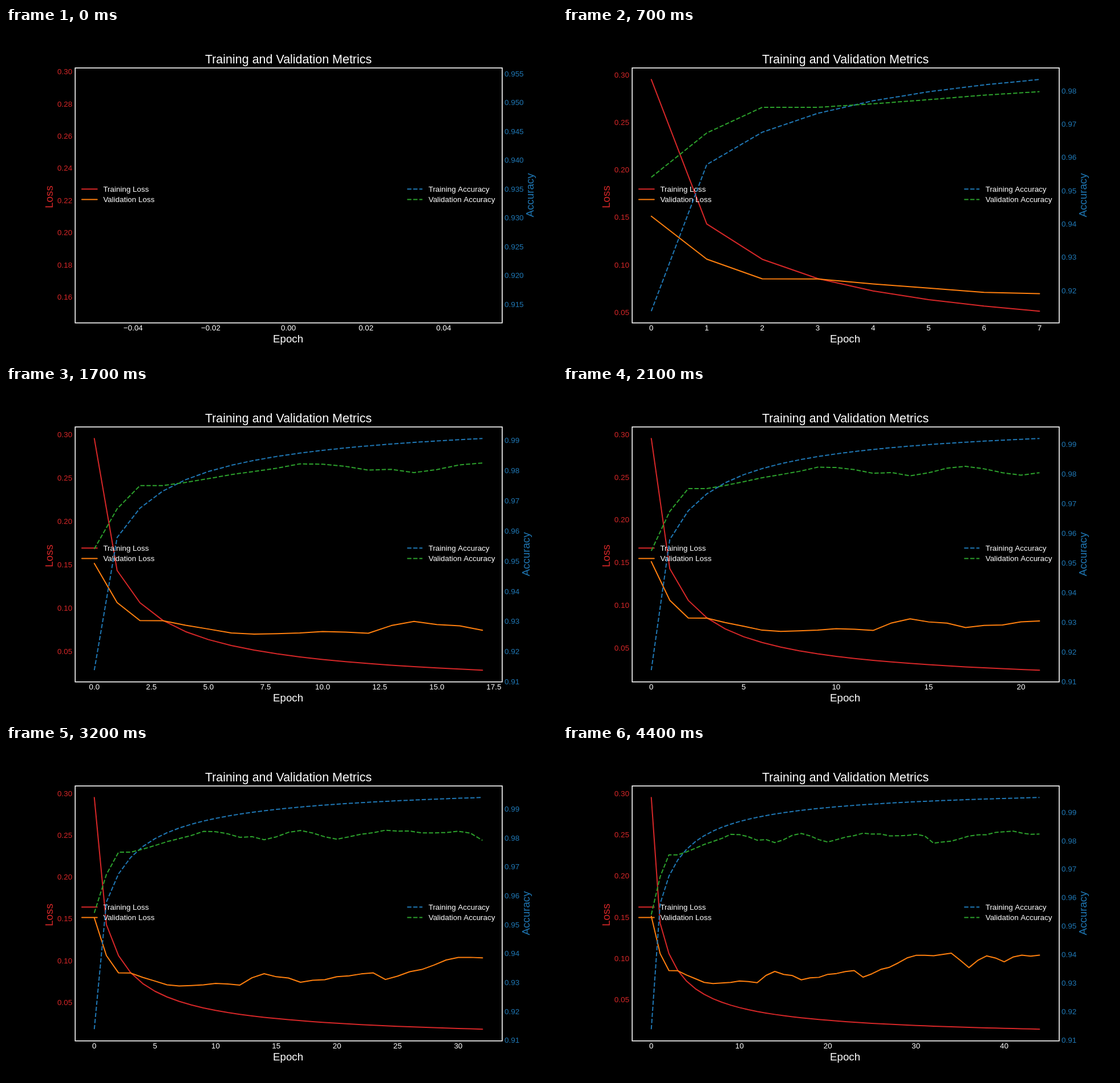
These frames come from a looping animation (966 by 580 pixels, 4500 ms). An HTML page with a canvas:

```html
<!DOCTYPE html>
<html lang="en">
<head>
<meta charset="utf-8">
<title>Training and Validation Metrics</title>
<style>
html, body { margin: 0; width: 100%; height: 100%; overflow: hidden; background: #000; }
canvas { display: block; }
</style>
</head>
<body>
<canvas id="stage" width="966" height="580"></canvas>
<script>
const g = document.getElementById('stage').getContext('2d');
const RED = '#d62728', ORANGE = '#ff7f0e', BLUE = '#1f77b4', GREEN = '#2ca02c', WHITE = '#fff';
const LEFT = 120.75, RIGHT = 869.4, TOP = 69.9, BOTTOM = 516.5;
const MID_X = (LEFT + RIGHT) / 2, MID_Y = (TOP + BOTTOM) / 2;
const SMALL = 13.42, LABEL = 18.78, TITLE = 21.47;
const EPOCHS = 45, STEP_MS = 100;

const series = rule => Array.from({ length: EPOCHS }, (_, i) => rule(i));

// Repeatable noise from -1 to 1
function noise(i) {
  const s = Math.sin(i * 12.9898) * 43758.5453;
  return (s - Math.floor(s)) * 2 - 1;
}

// Straight lines between [epoch, value] keys, with a little noise off the keys
function keyed(keys, jitter) {
  return series(i => {
    const k = keys.findIndex(([epoch]) => epoch >= i);
    const [e1, v1] = keys[k];
    if (e1 === i) return v1;
    const [e0, v0] = keys[k - 1];
    return v0 + (v1 - v0) * (i - e0) / (e1 - e0) + jitter * noise(i);
  });
}

// Training follows a power law after a steep first epoch
const trainLoss = series(i => i ? 0.1429 * (2 / (i + 1)) ** 0.742 : 0.2951);
const trainAcc = series(i => 1 - (i ? 0.0422 * (2.3 / (i + 1.3)) ** 0.725 : 0.0862));
const valLoss = keyed([
  [0, 0.1511], [1, 0.1059], [2, 0.0852], [3, 0.085], [6, 0.0709], [12, 0.0706],
  [14, 0.0842], [17, 0.074], [23, 0.0852], [24, 0.0773], [29, 0.1006], [34, 0.1063],
  [36, 0.0888], [38, 0.103], [40, 0.0959], [42, 0.1039], [44, 0.1039]
], 0.002);
const valAcc = keyed([
  [0, 0.954], [1, 0.9673], [2, 0.975], [3, 0.975], [7, 0.9797], [9, 0.9822], [14, 0.9793],
  [17, 0.9825], [20, 0.9795], [24, 0.9826], [31, 0.9816], [32, 0.9791], [40, 0.9831], [44, 0.9823]
], 0.0005);

function text(str, x, y, size, color, align = 'center', turn = 0) {
  g.save();
  g.translate(x, Math.round(y));
  g.rotate(turn);
  g.font = `${size}px "Liberation Sans", Arial, sans-serif`;
  g.textAlign = align;
  g.fillStyle = color;
  g.fillText(str, 0, 0);
  g.restore();
}

function line(points, color, dashed) {
  if (points.length < 2) return;
  g.strokeStyle = color;
  g.lineWidth = 2;
  g.lineJoin = 'round';
  g.lineCap = dashed ? 'butt' : 'round';
  g.setLineDash(dashed ? [7.45, 3.22] : []);
  g.beginPath();
  for (const [x, y] of points) g.lineTo(x, y);
  g.stroke();
}

// Axis fitted to the values with a 5% margin, at most nine tick intervals
function makeAxis(values, from, to) {
  let lo = Math.min(...values), hi = Math.max(...values);
  if (lo === hi) { lo -= 0.05; hi += 0.05; }
  const pad = (hi - lo) * 0.05;
  lo -= pad;
  hi += pad;
  const raw = (hi - lo) / 9, power = 10 ** Math.floor(Math.log10(raw));
  const step = [1, 2, 2.5, 5, 10].find(s => s * power >= raw) * power;
  let digits = 0;
  while (Math.abs(step * 10 ** digits - Math.round(step * 10 ** digits)) > 1e-6) digits++;
  const pos = v => from + (v - lo) / (hi - lo) * (to - from);
  const ticks = [];
  for (let k = Math.ceil(lo / step); k <= Math.floor(hi / step); k++) {
    ticks.push([pos(k * step), (k * step).toFixed(digits).replace('-', '\u2212')]);
  }
  return { pos, ticks, digits };
}

function legend(x, rows, dashed) {
  rows.forEach(([label, color], i) => {
    const y = 282.2 + i * 18.4;
    line([[x, y], [x + 26.8, y]], color, dashed);
    text(label, x + 37.4, y + 4.9, SMALL, WHITE, 'left');
  });
}

function draw(n) {
  const seen = list => list.slice(0, n + 1);
  const xAxis = makeAxis([0, n], LEFT, RIGHT);
  const lossAxis = makeAxis([...seen(trainLoss), ...seen(valLoss)], BOTTOM, TOP);
  const accAxis = makeAxis([...seen(trainAcc), ...seen(valAcc)], BOTTOM, TOP);
  const plot = (list, axis, color, dashed) =>
    line(seen(list).map((v, i) => [xAxis.pos(i), axis.pos(v)]), color, dashed);
  const digitWidth = SMALL * 0.556;

  g.fillStyle = '#000';
  g.fillRect(0, 0, 966, 580);

  plot(trainLoss, lossAxis, RED);
  plot(valLoss, lossAxis, ORANGE);
  legend(133, [['Training Loss', RED], ['Validation Loss', ORANGE]], false);
  plot(trainAcc, accAxis, BLUE, true);
  plot(valAcc, accAxis, GREEN, true);
  legend(703.3, [['Training Accuracy', BLUE], ['Validation Accuracy', GREEN]], true);

  g.setLineDash([]);
  g.lineJoin = 'miter';
  g.strokeStyle = WHITE;
  g.lineWidth = 1.6;
  g.strokeRect(121.3, 70, 748.6, 446.7);

  for (const [x, label] of xAxis.ticks) text(label, x, 530, SMALL, WHITE);
  for (const [y, label] of lossAxis.ticks) text(label, 116.2, y + 4.8, SMALL, RED, 'right');
  for (const [y, label] of accAxis.ticks) text(label, 874, y + 4.8, SMALL, BLUE, 'left');

  // Side titles make room for the tick labels
  text('Loss', 82 - (lossAxis.digits - 2) * digitWidth, MID_Y + 2.3, LABEL, RED, 'center', -Math.PI / 2);
  text('Accuracy', 918 + (accAxis.digits - 2) * digitWidth, MID_Y, LABEL, BLUE, 'center', -Math.PI / 2);
  text('Epoch', MID_X - 0.5, 551, LABEL, WHITE);
  text('Training and Validation Metrics', MID_X, 62, TITLE, WHITE);
}

const start = performance.now();
let shown = -1;
function tick() {
  const n = Math.floor((performance.now() - start) / STEP_MS) % EPOCHS;
  if (n !== shown) draw(shown = n);
  requestAnimationFrame(tick);
}
tick();
</script>
</body>
</html>
```
